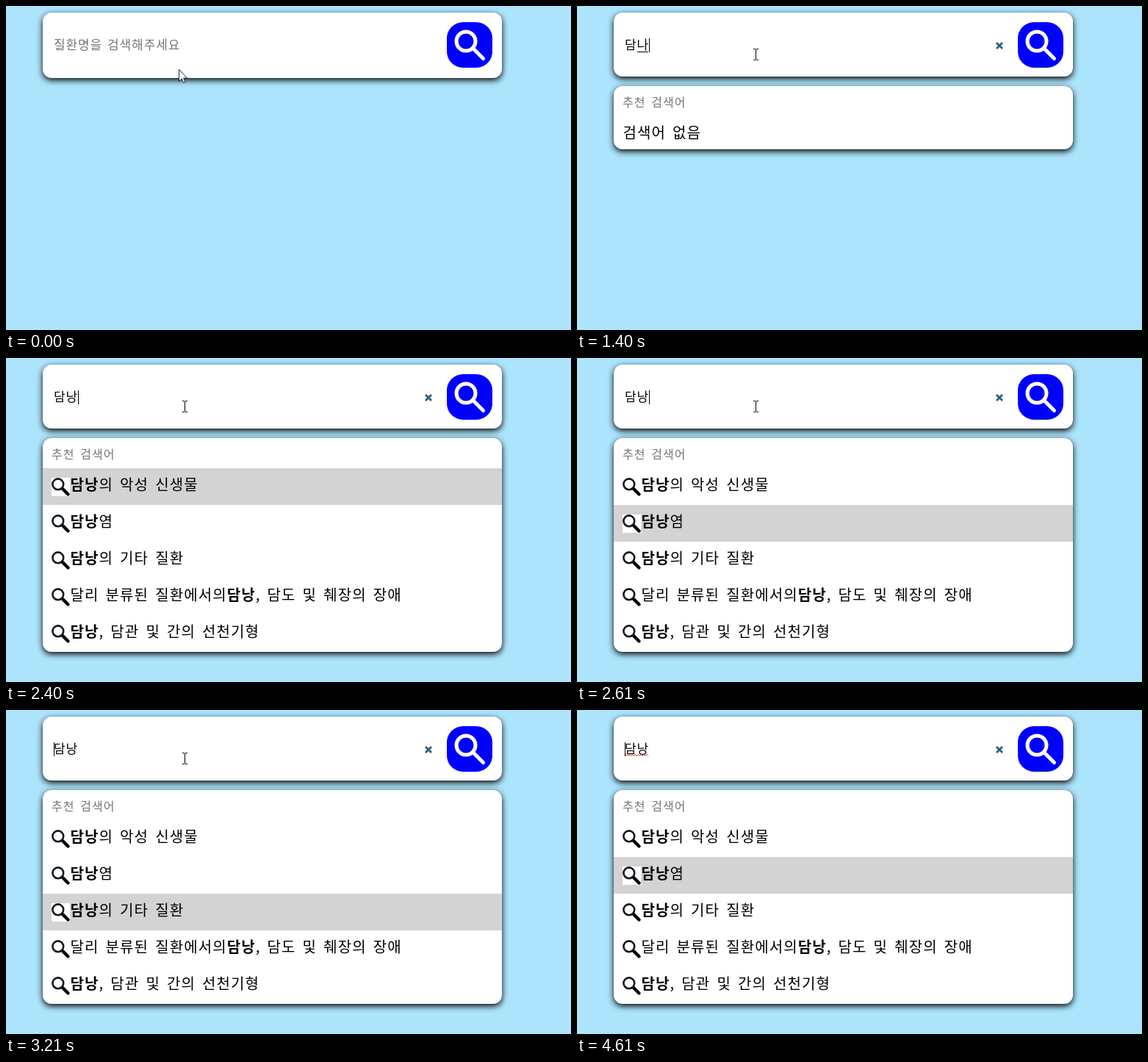
Recreate the animation shown at these times as an HTML page. Size 769 by 441 pixels, loop 4810 ms.

```html
<!DOCTYPE html>
<html lang="ko">
<head>
<meta charset="utf-8">
<title>질환 검색</title>
<style>
  html, body { margin: 0; width: 100%; height: 100%; overflow: hidden; background: #ace4fb; }
  #stage { position: absolute; left: 0; top: 0; width: 769px; height: 441px; overflow: hidden; background: #ace4fb; }
  .card { position: absolute; left: 50px; width: 625px; border-radius: 12px; background: #fff; box-shadow: 0 3px 9px #000; }
  #search { top: 9px; }
  #panel { top: 109px; }
  svg { position: absolute; left: 0; top: 0; }
  text { font-family: "Noto Sans CJK KR", "Noto Sans CJK", "Malgun Gothic", sans-serif; font-weight: 300; white-space: pre; }
  .field { font-size: 17px; letter-spacing: .9px; word-spacing: 1.2px; }
  .head { font-size: 16px; letter-spacing: 1.1px; word-spacing: 2px; fill: #757575; }
  .item { font-size: 20px; letter-spacing: 1.1px; word-spacing: 2.4px; }
  .item tspan { font-weight: 700; }
</style>
</head>
<body>
<div id="stage">
  <div id="search" class="card"></div>
  <div id="panel" class="card"></div>
  <svg width="769" height="441" viewBox="0 0 769 441">
    <defs>
      <g id="lens">
        <path d="M14 14L22.5 22.5" stroke="#000" stroke-width="4.4" stroke-linecap="round"/>
        <circle cx="8.8" cy="8.8" r="7.4" fill="#fff" stroke="#111820" stroke-width="2.6"/>
      </g>
    </defs>

    <rect x="600" y="22" width="62" height="62" rx="22" fill="#00f"/>
    <g fill="none" stroke="#fff" stroke-width="5">
      <circle cx="626" cy="48" r="13"/>
      <path d="M635.5 57.5L649.5 71.5" stroke-linecap="round"/>
    </g>

    <text id="hint" class="field" x="65" y="59" fill="#757575">질환명을 검색해주세요</text>
    <text id="typed" class="field" x="65" y="59"></text>
    <rect id="compose" y="62" width="15" height="1"/>
    <path id="squiggle" fill="none" stroke="#e8141c" stroke-width="1"/>
    <rect id="caret" y="44" width="1" height="19"/>
    <path id="clear" d="M571 50L579 58M579 50L571 58" stroke="#2c5c7e" stroke-width="2.7"/>

    <text id="head" class="head" x="62" y="137">추천 검색어</text>
    <text id="none" class="item" x="62.5" y="180">검색어 없음</text>
    <g id="list"></g>

    <circle id="click" cx="244" cy="65" r="15" fill="#ff0" fill-opacity=".47"/>
    <path id="beam" d="M240 58.5h3M244 58.5h3M243.5 59v14M240 73.5h3M244 73.5h3" fill="none" stroke="#000"/>
    <path id="arrow" d="M.5.5V16.5L4.2 13L6.7 18.5L9 17.5L6.6 12.1H11.5Z" fill="#fff" stroke="#1b2430" stroke-linejoin="round"/>
  </svg>
</div>
<script>
const LOOP = 4810;
const $ = id => document.getElementById(id);

const items = [
  '*담낭*의 악성 신생물',
  '*담낭*염',
  '*담낭*의 기타 질환',
  '달리 분류된 질환에서의*담낭*, 담도 및 췌장의 장애',
  '*담낭*, 담관 및 간의 선천기형'
];
const bold = s => s.replace(/\*(.+?)\*/g, '<tspan>$1</tspan>');
$('list').innerHTML =
  '<rect id="mark" x="50" width="625" height="50" fill="#d3d3d3"/>' +
  '<rect id="tile" x="62" width="25" height="25" fill="#fff"/>' +
  items.map((s, i) =>
    `<use href="#lens" x="62" y="${163 + 50 * i}"/>` +
    `<text class="item" x="87.5" y="${180 + 50 * i}">${bold(s)}</text>`).join('');

let wave = 'M65 62.5';
for (let i = 0; i < 16; i++) wave += `l2 ${i % 2 ? 2 : -2}`;
$('squiggle').setAttribute('d', wave);

// Each step changes some properties and keeps the rest.
const changes = [
  [0, { text: '', hint: 1, open: 0, full: 0, line: 0, caret: 0, row: 0, arrow: [235, 86], click: 0, wavy: 0 }],
  [200, { hint: 0, open: 1, arrow: null, click: 1 }],
  [400, { click: 0 }],
  [600, { text: 'ㄷ', line: 65, caret: 81 }],
  [800, { text: '다' }],
  [1000, { text: '담' }],
  [1200, { text: '담ㄴ', line: 82, caret: 98 }],
  [1400, { text: '담나' }],
  [1800, { text: '담낭', full: 1, caret: 0 }],
  [2400, { line: 0, caret: 98, row: 1 }],
  [2610, { row: 2 }],
  [2810, { row: 3, caret: 0 }],
  [3010, { row: 4 }],
  [3210, { row: 3, caret: 65 }],
  [3410, { row: 2 }],
  [3810, { caret: 0 }],
  [4010, { arrow: [375, 113] }],
  [4210, { arrow: [724, 347], wavy: 1 }],
  [4410, { arrow: [761, 425], caret: 65 }],
  [4610, { arrow: [800, 460] }]
];
let last = {};
const steps = changes.map(([at, c]) => ({ at, ...(last = { ...last, ...c }) }));

const show = (id, on) => { $(id).style.display = on ? '' : 'none'; };
function place(id, axis, value) {
  show(id, value);
  if (value) $(id).setAttribute(axis, value);
}

function draw(s) {
  $('search').style.height = (s.open ? 87 : 89) + 'px';
  $('panel').style.height = (s.full ? 291 : 86) + 'px';
  show('panel', s.open);
  show('head', s.open);
  show('none', s.open && !s.full);
  show('list', s.full);
  show('hint', s.hint);
  show('clear', s.text);
  show('squiggle', s.wavy);
  show('click', s.click);
  $('typed').textContent = s.text;
  place('compose', 'x', s.line);
  place('caret', 'x', s.caret);
  place('mark', 'y', s.row && 100 + 50 * s.row);
  place('tile', 'y', s.row && 113 + 50 * s.row);
  show('beam', !s.arrow);
  place('arrow', 'transform', s.arrow && `translate(${s.arrow})`);
}

const start = performance.now();
let current;
function tick() {
  const t = (performance.now() - start) % LOOP;
  const step = steps.filter(s => s.at <= t).pop();
  if (step !== current) draw(current = step);
  requestAnimationFrame(tick);
}
tick();
</script>
</body>
</html>
```
